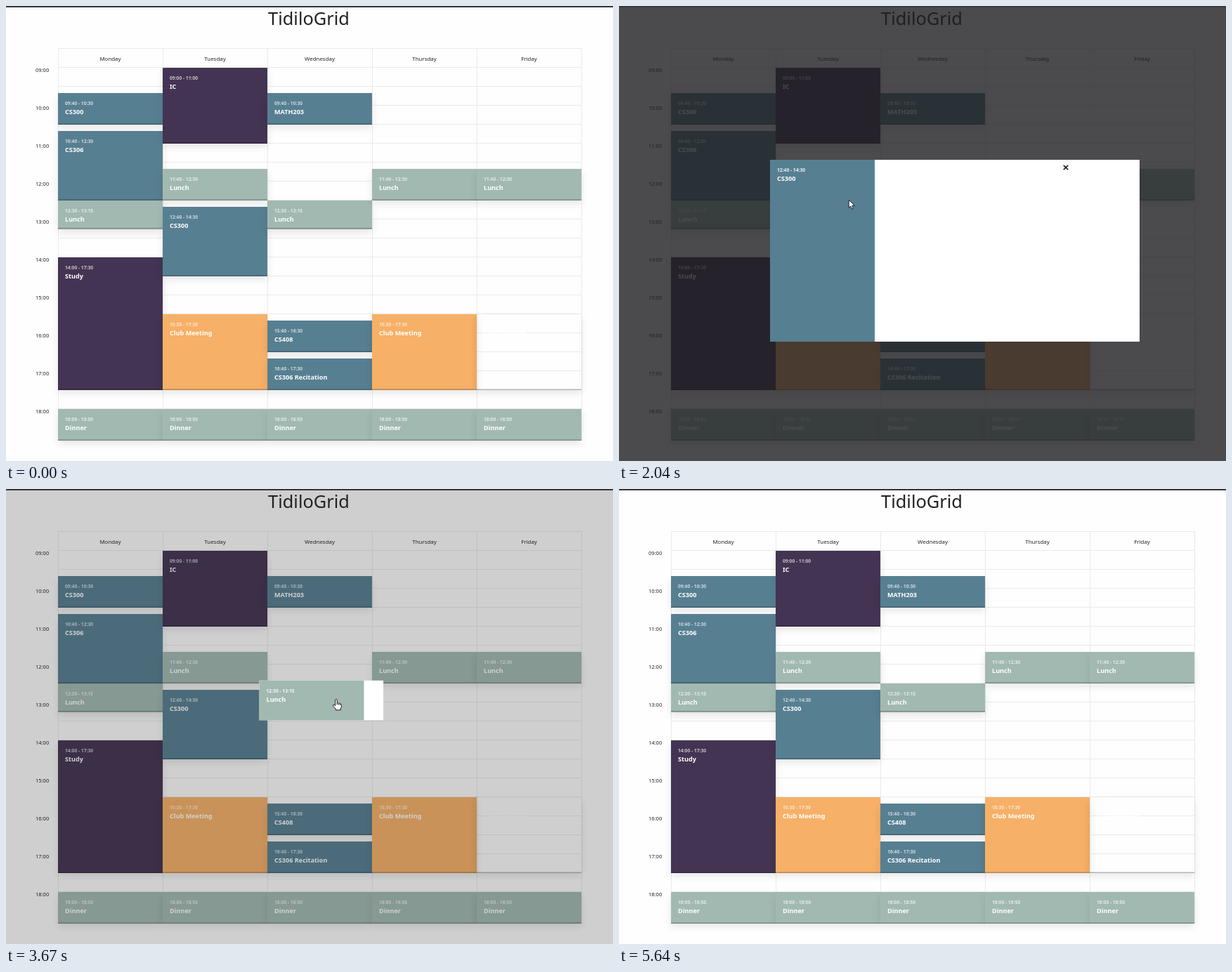
An HTML page with a canvas that plays this animation: 864x648 px, repeating every 6560 ms.

```html
<!DOCTYPE html>
<html lang="en">
<head>
<meta charset="utf-8">
<title>Weekly schedule</title>
<style>
  html, body { margin: 0; width: 100%; height: 100%; overflow: hidden; background: #fff; }
  canvas { display: block; }
</style>
</head>
<body>
<canvas id="stage" width="864" height="648"></canvas>
<script>
const ctx = document.getElementById('stage').getContext('2d');
const W = 864, H = 648, LOOP = 6560;
const LEFT = 74, TOP = 88, COL = 149, ROW = 27;
const FONT = '"Noto Sans", "Open Sans", sans-serif';
const BLUE = '#577f92', PURPLE = '#443453', GREEN = '#a2b9b2', ORANGE = '#f6b067';
const DAYS = ['Monday', 'Tuesday', 'Wednesday', 'Thursday', 'Friday'];

const minutes = s => s.slice(0, 2) * 60 + +s.slice(3);
const timeY = s => TOP + (minutes(s) - 540) * 0.9;

function tile(day, from, to, name, color) {
  const y = timeY(from);
  return { x: LEFT + day * COL, y, w: COL, h: timeY(to) - y, label: from + ' - ' + to, name, color };
}

const tiles = [
  tile(0, '09:40', '10:30', 'CS300', BLUE),
  tile(0, '10:40', '12:30', 'CS306', BLUE),
  tile(0, '12:30', '13:15', 'Lunch', GREEN),
  tile(0, '14:00', '17:30', 'Study', PURPLE),
  tile(1, '09:00', '11:00', 'IC', PURPLE),
  tile(1, '11:40', '12:30', 'Lunch', GREEN),
  tile(1, '12:40', '14:30', 'CS300', BLUE),
  tile(1, '15:30', '17:30', 'Club Meeting', ORANGE),
  tile(2, '09:40', '10:30', 'MATH203', BLUE),
  tile(2, '12:30', '13:15', 'Lunch', GREEN),
  tile(2, '15:40', '16:30', 'CS408', BLUE),
  tile(2, '16:40', '17:30', 'CS306 Recitation', BLUE),
  tile(3, '11:40', '12:30', 'Lunch', GREEN),
  tile(3, '15:30', '17:30', 'Club Meeting', ORANGE),
  tile(4, '11:40', '12:30', 'Lunch', GREEN),
  tile(4, '15:30', '17:30', 'Club Meeting', null),
  ...DAYS.map((_, day) => tile(day, '18:00', '18:50', 'Dinner', GREEN))
];

// Each modal: opening start, moment its body disappears, closing start
const DURATION = 450;
const OPEN = { x: 215, y: 219, h: 259, w: 526 };
const modals = [
  { tile: tiles[6], open: 1108, drop: 2373, close: 2463 },
  { tile: tiles[9], open: 3588, drop: 5100, close: 5170 }
];

// Pointer moves between rests
const moves = [
  { from: 300, to: 820, a: [804, 626], b: [302, 305] },
  { from: 1940, to: 2320, a: [302, 305], b: [446, 140] },
  { from: 2880, to: 3240, a: [446, 140], b: [470, 299] },
  { from: 4390, to: 4870, a: [470, 300], b: [528, 541] },
  { from: 5230, to: 5600, a: [528, 541], b: [745, 655] }
];

const clamp = v => Math.min(1, Math.max(0, v));
const mix = (a, b, p) => a + (b - a) * p;
const smooth = v => v * v * (3 - 2 * v);

function bezier(x1, y1, x2, y2) {
  const at = (a, b, s) => 3 * a * s * (1 - s) ** 2 + 3 * b * s * s * (1 - s) + s ** 3;
  return x => {
    if (x <= 0 || x >= 1) return clamp(x);
    let lo = 0, hi = 1;
    for (let i = 0; i < 24; i++) {
      const mid = (lo + hi) / 2;
      if (at(x1, x2, mid) < x) lo = mid; else hi = mid;
    }
    return at(y1, y2, lo);
  };
}
const ease = bezier(0.25, 0.1, 0.25, 1);
const swift = bezier(0.5, 0, 0.1, 1);

function rect(x, y, w, h, color) {
  ctx.fillStyle = color;
  ctx.fillRect(x, y, w, h);
}

function text(str, x, y, size, color, weight = 400, align = 'left') {
  ctx.font = `${weight} ${size}px ${FONT}`;
  ctx.textAlign = align;
  ctx.fillStyle = color;
  ctx.fillText(str, x, y);
}

function caption(item, x, y, timeColor) {
  text(item.label, x + 10, y + 17.4, 6.7, timeColor, 700);
  text(item.name, x + 10, y + 30.4, 9.1, '#fff', 700);
}

function drawTile(item) {
  const { x, y, w, h, color } = item;
  ctx.save();
  ctx.beginPath();
  ctx.rect(0, 0, W, H);
  ctx.rect(x, y, w, h);
  ctx.clip('evenodd');
  ctx.shadowColor = 'rgba(0,0,0,.1)';
  ctx.shadowBlur = 10.8;
  ctx.shadowOffsetY = 5.4;
  rect(x, y, w, h, '#000');
  ctx.restore();
  if (color) rect(x, y, w, h, color);
  rect(x, y + h - 1.6, w, 1.6, 'rgba(0,0,0,.23)');
  caption(item, x, y, 'rgba(255,255,255,.7)');
}

function drawSchedule(hidden) {
  rect(0, 0, W, H, '#fefefe');
  text('TidiloGrid', 431, 27, 25.4, '#222', 400, 'center');
  const line = '#eaeaea';
  rect(LEFT, 60, COL * 5 + 1, 1, line);
  for (let y = TOP - 1; y < 600; y += ROW) rect(LEFT, y, COL * 5 + 1, 1, line);
  for (let i = 0; i <= 5; i++) rect(LEFT + i * COL, 60, 1, 559, line);
  DAYS.forEach((day, i) => text(day, LEFT + (i + 0.5) * COL, 78, 7.9, '#222', 400, 'center'));
  for (let hour = 9; hour <= 18; hour++) {
    const label = String(hour).padStart(2, '0') + ':00';
    text(label, 42, timeY(label) + 5.7, 7.5, '#222');
  }
  tiles.forEach(item => { if (item !== hidden) drawTile(item); });
}

function drawModal(modal, t) {
  const closing = t >= modal.close;
  const k = clamp((t - (closing ? modal.close : modal.open)) / DURATION);
  const p = closing ? 1 - swift(k) : swift(k);
  const fade = closing ? 1 - ease(k) : ease(k);
  const from = modal.tile;
  const x = mix(from.x, OPEN.x, p), y = mix(from.y, OPEN.y, p), h = mix(from.h, OPEN.h, p);

  rect(0, 2, W, H - 2, `rgba(30,30,33,${0.8 * fade})`);
  if (t < modal.drop) {
    rect(x, y, mix(COL, OPEN.w, p), h, '#fff');
    drawClose(clamp((t - modal.open - DURATION) / 90));
  }
  rect(x, y, COL, h, from.color);
  caption(from, x, y, 'rgba(255,255,255,.9)');
}

function drawClose(alpha) {
  ctx.save();
  ctx.globalAlpha = alpha;
  ctx.translate(636, 230);
  ctx.strokeStyle = '#222';
  ctx.lineWidth = 1.7;
  ctx.beginPath();
  ctx.moveTo(-3.2, -3.2); ctx.lineTo(3.2, 3.2);
  ctx.moveTo(3.2, -3.2); ctx.lineTo(-3.2, 3.2);
  ctx.stroke();
  ctx.restore();
}

const ARROW = new Path2D('M0 0V11.2L2.6 8.8L4.5 13L6.4 12.2L4.6 8.1H8.2Z');
const HAND = new Path2D('M-1.3 1.2Q0-.6 1.3 1.2V6Q2.6 4.9 3.6 6.4Q5 5.6 5.7 7Q7.3 6.6 7.4 8.4' +
  'V11.5L6.2 14V15.8H-.6V14.2L-4.6 9.8Q-4.9 7.8-2.8 8.4L-1.3 9.8Z');
const KNUCKLES = new Path2D('M1.3 6V8.4M3.6 6.4V8.6M5.7 7V8.8');

function drawPointer(t, modal) {
  if (t < moves[0].from || t >= 5640) return;
  const move = moves.filter(m => t >= m.from).pop();
  const p = smooth(clamp((t - move.from) / (move.to - move.from)));
  const x = mix(move.a[0], move.b[0], p), y = mix(move.a[1], move.b[1], p);
  const over = tiles.some(i => x >= i.x && x < i.x + i.w && y >= i.y && y < i.y + i.h);
  const resting = (t >= 1030 && t < 1940) || (t >= 3510 && t < 4230);
  const hand = resting || (over && !modal);
  const shape = hand ? HAND : ARROW;
  ctx.save();
  ctx.translate(x, y);
  ctx.lineJoin = 'round';
  ctx.lineWidth = 1;
  ctx.strokeStyle = '#1c1c2a';
  ctx.fillStyle = '#fff';
  ctx.fill(shape);
  ctx.stroke(shape);
  if (hand) ctx.stroke(KNUCKLES);
  ctx.restore();
}

function draw(t) {
  const modal = modals.find(m => t >= m.open && t < m.close + DURATION);
  drawSchedule(modal && modal.tile);
  if (modal) drawModal(modal, t);
  rect(0, 0, W, 2, '#39393b');
  drawPointer(t, modal);
}

const start = performance.now();
function tick() {
  draw((performance.now() - start) % LOOP);
  requestAnimationFrame(tick);
}
tick();
</script>
</body>
</html>
```
